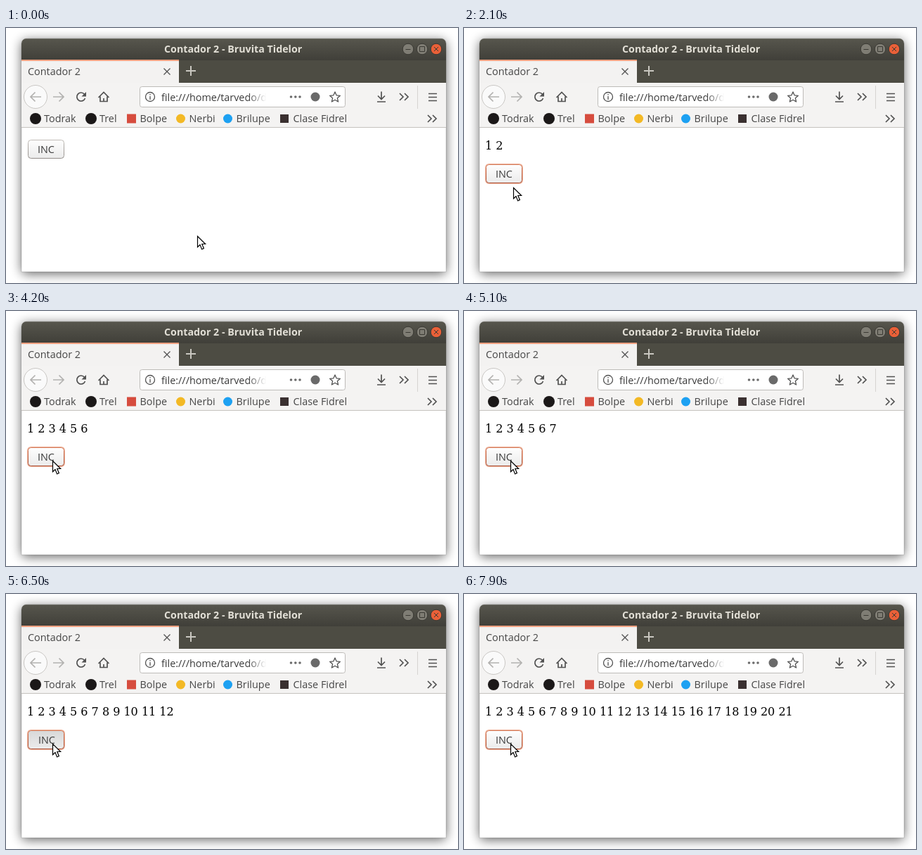
Animation, 643 px wide and 363 px high, one loop 8 s. Source, as an HTML page:

```html
<!DOCTYPE html>
<html lang="es">
<head>
<meta charset="utf-8">
<title>Contador 2</title>
<style>
  html, body { margin: 0; width: 100%; height: 100%; overflow: hidden; background: #fff; }
  svg { display: block; width: 643px; height: 363px; }
  text { font: 14.4px "Open Sans", "Noto Sans", sans-serif; fill: #464646; }
  .title { font-size: 14.25px; font-weight: 700; fill: #e2dfd6; }
  .dark { fill: #3a3a3a; }
  #numbers text { font: 16px "DejaVu Serif", "Noto Serif", serif; fill: #000; }
  .icon { fill: none; stroke: #525252; stroke-width: 1.7; }
  .thin { stroke-width: 1.3; }
  .off { stroke: #b3b2b0; }
</style>
</head>
<body>
<svg viewBox="0 0 643 363">
  <defs>
    <linearGradient id="bar" x2="0" y2="1">
      <stop stop-color="#57564d"/><stop offset="1" stop-color="#403f39"/>
    </linearGradient>
    <linearGradient id="raised" x2="0" y2="1">
      <stop stop-color="#fefefe"/><stop offset="1" stop-color="#ebebeb"/>
    </linearGradient>
    <linearGradient id="sunken" x2="0" y2="1">
      <stop stop-color="#d8d8d8"/><stop offset="1" stop-color="#ececec"/>
    </linearGradient>
    <linearGradient id="plainEdge" x2="0" y2="1">
      <stop stop-color="#c0bbb6"/><stop offset="1" stop-color="#938e8a"/>
    </linearGradient>
    <linearGradient id="focusEdge" x2="0" y2="1">
      <stop stop-color="#d47c5b"/><stop offset="1" stop-color="#a94f36"/>
    </linearGradient>
    <linearGradient id="fade">
      <stop offset=".15" stop-color="#fff" stop-opacity="0"/><stop offset="1" stop-color="#fff"/>
    </linearGradient>
    <filter id="blur" x="-10%" y="-15%" width="120%" height="130%">
      <feGaussianBlur stdDeviation="8"/>
    </filter>
    <clipPath id="urlClip"><rect x="215" y="85" width="155" height="27"/></clipPath>
    <path id="chevrons" d="M-6-5l5 5-5 5M1-5l5 5-5 5"/>
  </defs>

  <rect width="643" height="363" fill="#fff"/>
  <rect x="22" y="18" width="604" height="332" rx="6" opacity=".6" filter="url(#blur)"/>

  <!-- title bar and tabs -->
  <path d="M22 347V22a7 7 0 0 1 7-7H619a7 7 0 0 1 7 7V347Z" fill="#fff" stroke="#000" stroke-opacity=".15"/>
  <path d="M22 46V22a7 7 0 0 1 7-7H619a7 7 0 0 1 7 7V46Z" fill="url(#bar)"/>
  <path d="M28 15.5H620" stroke="#6b6a62"/>
  <rect x="22" y="46" width="604" height="32" fill="#4d4c43"/>
  <text class="title" x="225" y="35">Contador 2 - Bruvita Tidelor</text>
  <g stroke="#3a3933">
    <circle cx="572" cy="30" r="7.8" fill="#7f7d74"/>
    <circle cx="592" cy="30" r="7.8" fill="#7f7d74"/>
    <circle cx="612" cy="30" r="7.8" fill="#ea6038"/>
    <path d="M568.5 30.5h7M588.5 26.5h7v7h-7ZM609 27l6 6M615 27l-6 6" fill="none"/>
  </g>
  <rect x="22" y="46" width="224" height="32" fill="#f3f2f1"/>
  <rect x="22" y="45" width="224" height="2" fill="#f0a080"/>
  <text x="31" y="67">Contador 2</text>
  <path class="icon thin" d="M224.500 57.500l9 9M233.500 57.500l-9 9"/>
  <path d="M256 61h14M263 54v14" stroke="#c9c7c0" stroke-width="2"/>

  <!-- navigation toolbar -->
  <rect x="22" y="78" width="604" height="63" fill="#f4f3f2"/>
  <path d="M22 141.500H626" stroke="#c5c2be"/>
  <circle cx="42" cy="98" r="16.500" fill="#fafafa" stroke="#c9c7c4"/>
  <path class="icon off" d="M50 98H35M41.500 91.500L35 98l6.500 6.500M67 98H82M75.500 91.500L82 98l-6.500 6.500"/>
  <path class="icon" d="M111.500 94.200A6 6 0 1 0 112.500 100"/>
  <path d="M114 91v6.500h-6.500Z" fill="#525252"/>
  <path class="icon" d="M131.500 99L139 91.500 146.500 99M134 97.500V104.500H144V97.500M139 104v-4"/>
  <rect x="190.500" y="83.500" width="292" height="29" rx="3" fill="#fff" stroke="#bdbbb8"/>
  <circle class="icon thin" cx="205" cy="98" r="6.500"/>
  <path class="icon thin" d="M205 97v5M205 94v1.600"/>
  <g clip-path="url(#urlClip)">
    <text class="dark" x="221" y="104">file:///home/tarvedo/d</text>
    <rect x="340" y="85" width="30" height="27" fill="url(#fade)"/>
  </g>
  <g fill="#6a6a6a">
    <circle cx="405.500" cy="98" r="1.800"/><circle cx="411.800" cy="98" r="1.800"/>
    <circle cx="418" cy="98" r="1.800"/><circle cx="440" cy="98" r="6.500"/>
  </g>
  <path id="star" class="icon thin" stroke-linejoin="round"/>
  <path class="icon" d="M534 90.500V101M529 96.500l5 5 5-5M528 105h12"/>
  <use href="#chevrons" class="icon" x="566" y="98"/>
  <path d="M585.500 82V115" stroke="#d6d4d1"/>
  <path class="icon" d="M601 93.500h12M601 98.500h12M601 103.500h12"/>
  <g id="bookmarks"></g>
  <use href="#chevrons" class="icon" x="606" y="129"/>

  <!-- page -->
  <g id="numbers"></g>
  <g id="button">
    <rect id="glow" x="31" y="0" width="52" height="27" rx="4.500" fill="none" stroke="#f0b49c" stroke-width="2"/>
    <rect id="face" x="31.500" y=".500" width="51" height="26" rx="4"/>
    <text id="label" class="dark" y="19">INC</text>
  </g>
  <path id="cursor" d="M.5.500V15.800L4 12.500 6.600 18.900 9.400 17.700 6.800 11.500H11.600Z" fill="#fff" stroke="#000" stroke-width="1.200"/>
</svg>

<script>
const LOOP = 8000, STEP = 100;
const $ = id => document.getElementById(id);

function add(parent, tag, attrs, content = '') {
  const el = document.createElementNS('http://www.w3.org/2000/svg', tag);
  for (const key in attrs) el.setAttribute(key, attrs[key]);
  el.textContent = content;
  parent.append(el);
  return el;
}

// Bookmarks: left edge of the icon, icon size, corner radius, colour, name
[
  [34, 16, 8, '#1b1818', 'Todrak'], [113, 16, 8, '#1b1818', 'Trel'],
  [172, 13, 0, '#d64c3e', 'Bolpe'], [242, 13, 7, '#f3b925', 'Nerbi'],
  [309, 13, 7, '#1da1f2', 'Brilupe'], [390, 12, 0, '#3a3030', 'Clase Fidrel']
].forEach(([x, size, rx, fill, name]) => {
  add($('bookmarks'), 'rect', { x, y: 129 - size / 2, width: size, height: size, rx, fill });
  add($('bookmarks'), 'text', { x: x + (size > 13 ? 20 : 18.5), y: 134 }, name);
});

const starPoints = Array.from({ length: 10 }, (_, i) => {
  const r = i % 2 ? 3.6 : 7.8, a = i * Math.PI / 5;
  return `${468 + r * Math.sin(a)} ${98.7 - r * Math.cos(a)}`;
});
$('star').setAttribute('d', `M${starPoints.join('L')}Z`);

const DIGIT = 10.18, SPACE = 5.09;
let penX = 30;
const numbers = Array.from({ length: 21 }, (_, i) => {
  const label = String(i + 1);
  const el = add($('numbers'), 'text', { x: penX, y: 173 }, label);
  penX += label.length * DIGIT + SPACE;
  return el;
});

// Clicking pace: time and count reached, steady in between
const pace = [[1000, 0], [1200, 1], [1900, 2], [2600, 3], [2900, 4], [3300, 5],
  [4200, 6], [5100, 7], [6100, 11], [6400, 12], [7900, 21]];

// Pointer glides: start, end, x, y; it rests in between
const home = [272, 296];
const glides = [[500, 1000, 67, 179], [1400, 1500, 86, 210], [1600, 1700, 70, 210],
  [1900, 2100, 70, 227], [2200, 2600, 64, 210], [3200, 3600, 70, 250], [3600, 4100, 66, 213]];

const clamp01 = u => Math.min(1, Math.max(0, u));
const smooth = u => u * u * (3 - 2 * u);

const progressAt = t => pace.slice(1).reduce((n, [end, to], i) => {
  const [start, from] = pace[i];
  return n + (to - from) * clamp01((t - start) / (end - start));
}, 0) + 1e-6;

const pointerAt = t => glides.reduce(([x, y], [start, end, toX, toY]) => {
  const k = smooth(clamp01((t - start) / (end - start)));
  return [x + (toX - x) * k, y + (toY - y) * k];
}, home).map(Math.round);

function draw(time) {
  const t = Math.floor(time % LOOP / STEP) * STEP;
  const progress = progressAt(t), shown = Math.floor(progress);
  const [x, y] = pointerAt(t);
  const top = shown ? 194 : 159;
  const over = x < 83 && y >= top && y < top + 27;
  const pressed = over && progress - shown > .45 + .1 * (shown > 0);
  const focused = shown > 0 || pressed;

  numbers.forEach((el, i) => el.setAttribute('visibility', i < shown ? 'visible' : 'hidden'));
  $('button').setAttribute('transform', `translate(0 ${top})`);
  $('glow').setAttribute('visibility', focused ? 'visible' : 'hidden');
  $('face').setAttribute('fill', `url(#${pressed ? 'sunken' : 'raised'})`);
  $('face').setAttribute('stroke', `url(#${focused ? 'focusEdge' : 'plainEdge'})`);
  $('label').setAttribute('x', pressed ? 46 : 45);
  $('cursor').setAttribute('transform', `translate(${x} ${y})`);
}

const start = performance.now();
function tick() {
  draw(performance.now() - start);
  requestAnimationFrame(tick);
}
tick();
</script>
</body>
</html>
```
